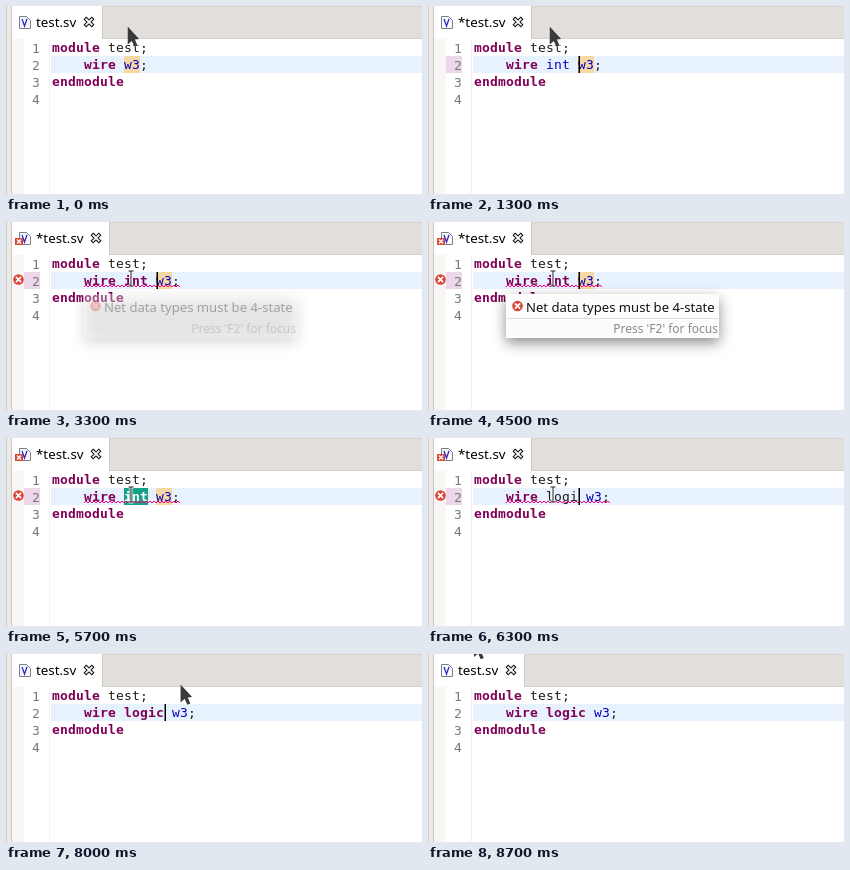
Animation, 416 px wide and 188 px high, one loop 8900 ms. Source, as an HTML page with a canvas:

```html
<!DOCTYPE html>
<html lang="en">
<head>
<meta charset="utf-8">
<title>Editor</title>
<style>
html, body { margin: 0; width: 100%; height: 100%; overflow: hidden; background: #fff; }
canvas { display: block; width: 416px; height: 188px; }
</style>
</head>
<body>
<canvas id="stage" width="416" height="188"></canvas>
<script>
const ctx = document.getElementById('stage').getContext('2d', { alpha: false });
const W = 416, H = 188, LOOP = 8900;
const CELL = 8, ROW = 17, LEFT = 46, TOP = 33;
const TYPE_X = LEFT + 9 * CELL;
const MONO = '13px "DejaVu Sans Mono", monospace';
const UI = '"Noto Sans", sans-serif';
const KEYWORD = '#7f0055', BLUE = '#0000c0', INK = '#1c1c1c', RED = '#dc4437';

const within = (t, a, b) => t >= a && t < b;
const clamp = v => Math.min(1, Math.max(0, v));
const mix = (a, b, p) => a + (b - a) * p;

function rect(x, y, w, h, color) {
  ctx.fillStyle = color;
  ctx.fillRect(x, y, w, h);
}

function label(s, x, y, color, size, align = 'left') {
  ctx.font = size + 'px ' + UI;
  ctx.fillStyle = color;
  ctx.textAlign = align;
  ctx.fillText(s, x, y);
}

function code(s, col, row, color, bold) {
  ctx.fillStyle = color;
  ctx.font = (bold ? 'bold ' : '') + MONO;
  ctx.textAlign = 'left';
  [...s].forEach((c, i) => ctx.fillText(c, LEFT + (col + i) * CELL, 46 + row * ROW));
}

function path(points, close) {
  ctx.beginPath();
  points.forEach(([x, y]) => ctx.lineTo(x, y));
  if (close) ctx.closePath();
}

function stroke(color, width) {
  ctx.strokeStyle = color;
  ctx.lineWidth = width;
  ctx.stroke();
}

function cross(x, y, r, color, width) {
  ctx.beginPath();
  for (const s of [-1, 1]) {
    ctx.moveTo(x - r, y - r * s);
    ctx.lineTo(x + r, y + r * s);
  }
  stroke(color, width);
}

function errorBadge(x, y) {
  ctx.beginPath();
  ctx.arc(x, y, 5.3, 0, Math.PI * 2);
  ctx.fillStyle = RED;
  ctx.fill();
  cross(x, y, 2.6, '#fff', 1.7);
}

function drawTab(dirty, error) {
  const right = dirty ? 103 : 96;
  rect(0, 0, W, TOP, '#e1dedb');
  rect(0, 0, W, 1, '#d6d2ce');
  rect(0, TOP - 1, W, 1, '#d3cfcb');
  rect(6, 0, right - 6, TOP, '#fff');
  rect(right, 0, 1, TOP, '#cdc9c5');

  path([[13.5, 10.5], [20.5, 10.5], [24.5, 14.5], [24.5, 22.5], [13.5, 22.5]], true);
  ctx.fillStyle = '#f8f9fd';
  ctx.fill();
  stroke('#7d7d88', 1);
  path([[16, 13], [18.5, 20], [21, 13]]);
  stroke('#2a2ac4', 1.3);
  if (error) {
    rect(9, 16, 8, 7, RED);
    cross(13, 19.5, 2, '#fff', 1.5);
  }

  label((dirty ? '*' : '') + 'test.sv', 30, 21, '#000', 13.33);
  ctx.lineCap = 'square';
  cross(right - 13, 16, 2.8, '#111', 3.8);
  cross(right - 13, 16, 2.8, '#fff', 1.8);
  ctx.lineCap = 'butt';
}

function drawMargin() {
  rect(0, 0, 1, H, '#d0cdca');
  rect(1, 0, 4, H, '#ece9e7');
  rect(5, 0, 1, H, '#c9c5c1');
  rect(6, TOP, 12, H, '#f8f7f6');
  rect(43, TOP, 1, H, '#f0f0f0');
}

// The word standing before w3, with its trailing space once complete.
function wordAt(t) {
  if (t < 1000) return '';
  if (t < 5800) return 'int '.slice(0, 1 + Math.floor((t - 1000) / 100));
  return 'logic'.slice(0, 1 + Math.floor((t - 5800) / 166)) + ' ';
}

const blink = dt => Math.floor(dt / 600) % 2 === 1;

function caretOn(t) {
  if (t < 2700) return t >= 400;
  if (t < 5700) return blink(t - 2700);
  if (t < 7400) return t >= 5800;
  return blink(t - 7400);
}

function squiggle(x0, x1) {
  ctx.beginPath();
  for (let x = x0; x <= x1; x += 2) ctx.lineTo(x, (x - x0) % 4 ? 63 : 65);
  stroke('#ff0080', 1);
}

function drawCode(t, error) {
  const word = wordAt(t), n = word.length;
  const selected = within(t, 5700, 5800);
  const wx = TYPE_X + n * CELL;
  rect(45, 50, W, ROW, '#e8f2fe');
  if (within(t, 1000, 8000)) rect(18, 50, 16, ROW, '#ecd6ea');
  if (t < 5800) rect(wx, 50, 16, ROW, '#f6d8a5');
  if (selected) rect(TYPE_X, 50, 24, ROW, '#16a085');

  ctx.save();
  ctx.translate(0, 1);
  for (let i = 0; i < 4; i++) code(String(i + 1), -2.5, i, '#787878');
  ctx.restore();

  const known = word === 'logic ' || within(t, 1800, 5800);
  const color = selected ? '#fff' : known ? KEYWORD : t < 1800 ? BLUE : INK;
  code('module', 0, 0, KEYWORD, true);
  code('test;', 7, 0, INK);
  code('wire', 4, 1, KEYWORD, true);
  code(word, 9, 1, color, known);
  code('w3', 9 + n, 1, BLUE);
  code(';', 11 + n, 1, INK);
  code('endmodule', 0, 2, KEYWORD, true);

  if (error) {
    squiggle(78, wx + 24);
    errorBadge(12.5, 57.5);
  }
  if (caretOn(t)) rect(wx - (t < 5800 ? 0 : CELL) + 0.5, 50, 1.5, ROW, '#000');
}

function drawTip(t) {
  const alpha = t < 4500 ? clamp((t - 3200) / 300) : clamp((5100 - t) / 200);
  if (t < 3300 || alpha === 0) return;
  ctx.save();
  ctx.globalAlpha = alpha;
  ctx.shadowColor = 'rgba(0,0,0,.45)';
  ctx.shadowBlur = 14;
  ctx.shadowOffsetY = 5;
  rect(78, 72, 213, 44, '#fcfcfc');
  ctx.shadowColor = 'transparent';
  rect(79, 96, 211, 1, '#dedede');
  errorBadge(89.5, 84);
  label('Net data types must be 4-state', 98, 90, '#111', 13.1);
  label("Press 'F2' for focus", 290, 111, '#8a8a8a', 12, 'right');
  ctx.restore();
}

// Down into the text, a nudge right, then a curve out over the top edge.
function mouseAt(t) {
  const down = clamp((t - 2100) / 400), nudge = clamp((t - 2700) / 600);
  const u = clamp((t - 7700) / 700), v = 1 - u;
  const x = mix(121.2, 125, nudge);
  const y = mix(20.5, 56.5, down);
  return [v * v * x + 2 * u * v * 255 + u * u * 45.5,
          v * v * y + 2 * u * v * 30 - u * u * 15];
}

function drawMouse(t) {
  const [x, y] = mouseAt(t);
  ctx.save();
  ctx.translate(x, y);
  if (y < TOP) {
    path([[0.5, 0], [12, 12.5], [7.7, 13], [10.3, 19], [7.2, 20.3], [4.6, 14.4], [0.5, 18]], true);
    stroke('rgba(255,255,255,.55)', 1.2);
    ctx.fillStyle = '#3a3a3a';
    ctx.fill();
  } else {
    ctx.beginPath();
    for (const s of [-1, 1]) {
      ctx.moveTo(-2.5, 7.5 * s);
      ctx.lineTo(2.5, 7.5 * s);
    }
    ctx.moveTo(0, -7.5);
    ctx.lineTo(0, 7.5);
    stroke('rgba(255,255,255,.85)', 3);
    stroke('#222', 1);
  }
  ctx.restore();
}

function draw(now) {
  const t = Math.floor((now % LOOP) / 100) * 100;
  const error = within(t, 1800, 7000);
  rect(0, 0, W, H, '#fff');
  drawTab(within(t, 1000, 7400), error);
  drawMargin();
  drawCode(t, error);
  drawTip(t);
  drawMouse(t);
}

const begin = performance.now();
function tick() {
  draw(performance.now() - begin);
  requestAnimationFrame(tick);
}
tick();
</script>
</body>
</html>
```
